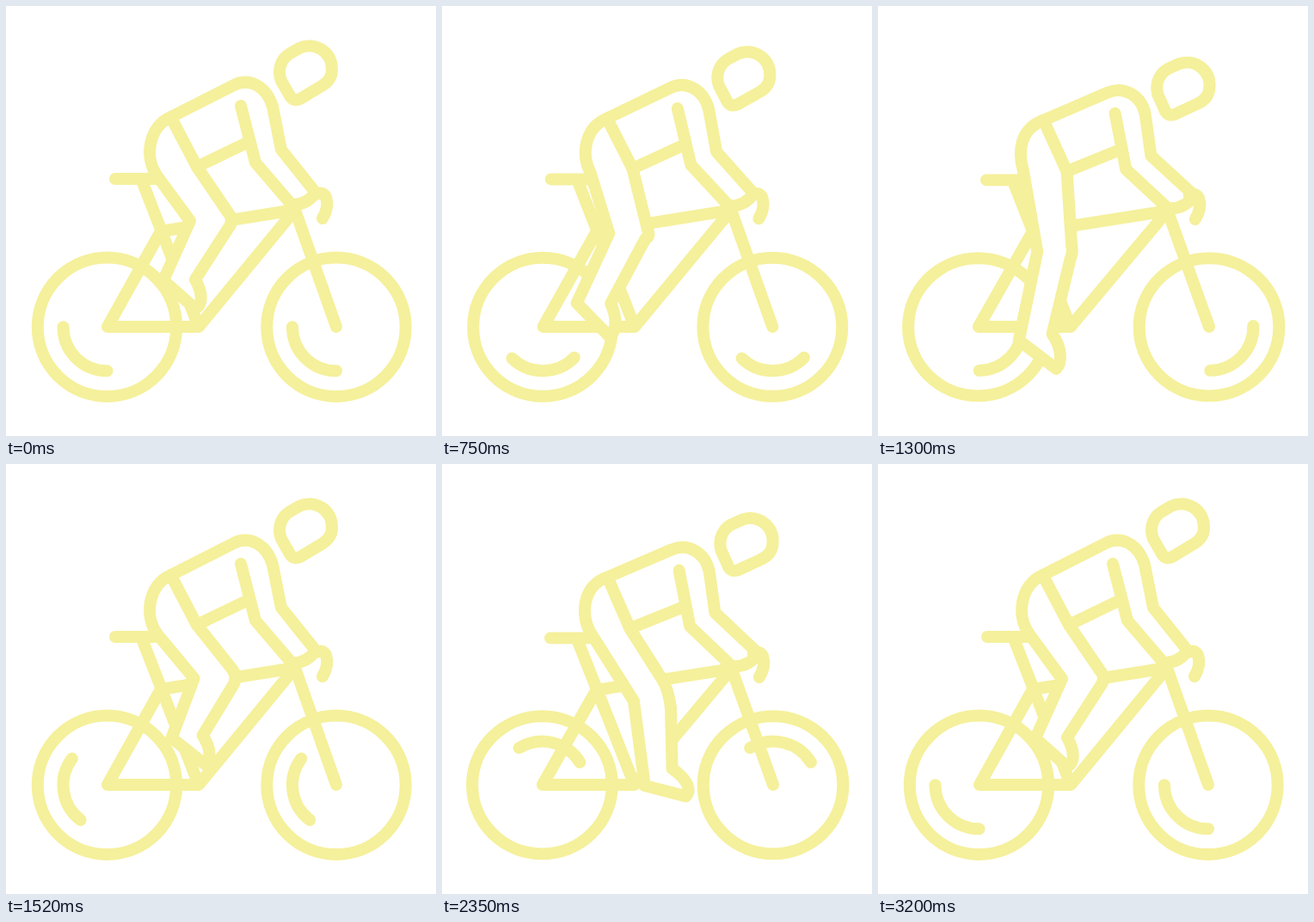
An HTML page for the animation above (3220 ms loop, 500 px wide and 500 px high).

```html
<!DOCTYPE html>
<html lang="en">
<head>
<meta charset="utf-8">
<title>Cyclist</title>
<style>
  html, body { margin: 0; width: 100%; height: 100%; overflow: hidden; background: #fff; }
  svg { display: block; width: 100vw; height: 100vh; }
  .line { fill: none; stroke: #f5f09b; stroke-width: 14; stroke-linecap: round; stroke-linejoin: round; }
  #leg { fill: #fff; }
</style>
</head>
<body>
<svg viewBox="0 0 500 500">
  <defs>
    <g id="wheel">
      <circle r="80.7"/>
      <path class="glint" d="M-51 0A51 51 0 0 0 0 51"/>
    </g>
  </defs>
  <g class="line">
    <g id="bike">
      <g id="wheels"></g>
      <path d="M127 201H174M158 203L224 373H118L180 262L336 237L224 373M336 237L384 373"/>
      <path d="M361 219Q368 215 372 222Q376 234 368 247"/>
    </g>
    <path id="leg"/>
    <path id="torso"/>
    <path id="shirt"/>
    <path id="head" d="M331 106L320 87C315 74 320 62 329 56L341 49C358 41 379 52 379 74C379 83 374 89 367 93L342 108Q335 111 331 106Z"/>
  </g>
</svg>
<script>
const LOOP = 3220, START = 195, STEP = 25, RIDE = 3000;
const byId = id => document.getElementById(id);

// Each shape has three poses: pedal up, pedal forward, pedal back.
const poses = {
  leg: [
    'M192 129C166 140 160 176 176 198L214 250L183 319L220 352C229 347 229 334 220 318L260 256Q265 248 258 240L222 187',
    'M193 132C162 142 162 176 171 194L219 281L234 385L283 397C290 388 283 375 266 364L261 290Q258 267 250 254L218 192',
    'M193 133C164 143 163 170 168 190L186 290L171 398L216 428C224 420 220 400 209 388L224 298Q226 290 224 280L219 193'
  ],
  torso: [
    'M192 129L263 93C282 82 303 93 310 117L320 167L360 217Q349 232 332 231L290 182L273 116',
    'M193 132L267 101C286 93 307 104 311 127L317 174L369 221Q358 237 338 236L288 190L276 125',
    'M193 133L267 102C286 94 307 105 311 128L317 175L369 221Q358 237 338 236L288 191L276 126'
  ],
  shirt: [
    'M192 130L222 187L280 159',
    'M193 133L218 192L280 168',
    'M193 134L219 193L280 169'
  ]
};
const numbers = d => d.match(/-?[\d.]+/g).map(Number);
const values = Object.fromEntries(Object.entries(poses).map(([id, list]) => [id, list.map(numbers)]));

// Harmonic through the poses at pedal angles 0, 125 and 235 degrees.
const SIDE = 125 * Math.PI / 180;
function blend(up, forward, back, angle) {
  const cosPart = (up - (forward + back) / 2) / (1 - Math.cos(SIDE));
  const sinPart = (forward - back) / (2 * Math.sin(SIDE));
  return up + cosPart * (Math.cos(angle) - 1) + sinPart * Math.sin(angle);
}

// Three and a half steady turns, then a slower last half.
function turns(ms, period) {
  const knot = 3.5 * period;
  return ms < knot ? ms / period : 3.5 + 0.5 * (ms - knot) / (RIDE - knot);
}

byId('wheels').innerHTML = [117.5, 384]
  .map(x => `<use href="#wheel" x="${x}" y="373.3"/>`).join('');
const glint = document.querySelector('.glint');

function draw(time) {
  const step = Math.max(0, Math.floor((time % LOOP - START) / STEP));
  const ms = Math.min(RIDE, step * STEP);
  const pedal = turns(ms, 650) * 2 * Math.PI;
  const mix = (a, b, c) => blend(a, b, c, pedal);

  for (const id in poses) {
    const [up, forward, back] = values[id];
    let i = 0;
    const d = poses[id][0].replace(/-?[\d.]+/g, () => {
      const v = mix(up[i], forward[i], back[i]);
      i++;
      return v.toFixed(2);
    });
    byId(id).setAttribute('d', d);
  }

  const sx = mix(1, 1.009, 1.009), sy = mix(1, 0.991, 0.991);
  byId('bike').setAttribute('transform', `translate(251 373) scale(${sx} ${sy}) translate(-251 -373)`);
  byId('head').setAttribute('transform',
    `translate(${mix(0, 6.2, 7)} ${mix(0, 19.2, 21.5)}) rotate(${mix(0, 7, 7)} 348.5 78)`);
  glint.setAttribute('transform', `rotate(${turns(ms, 630) * 360})`);
}

const begin = performance.now();
function tick() {
  draw(performance.now() - begin);
  requestAnimationFrame(tick);
}
tick();
</script>
</body>
</html>
```
